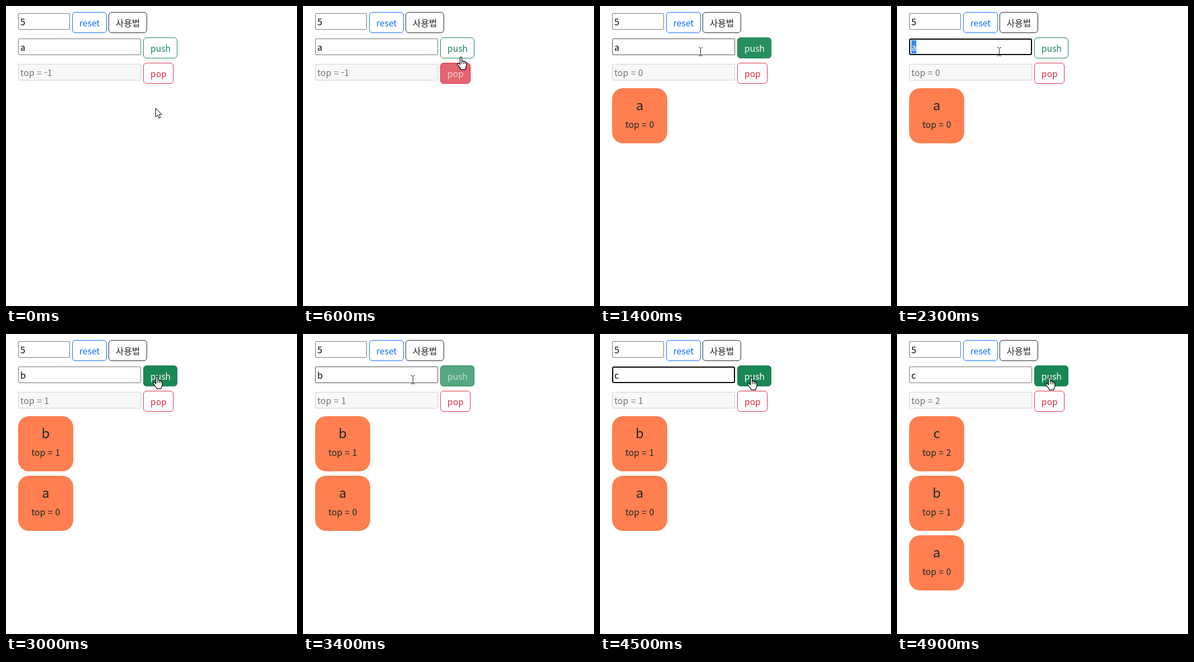
An HTML page that plays this animation: 528x544 px, repeating every 5000 ms.

```html
<!DOCTYPE html>
<html lang="ko">
<head>
<meta charset="utf-8">
<title>Stack</title>
<style>
  html, body { margin: 0; width: 100%; height: 100%; overflow: hidden; background: #fff; }
  svg { display: block; font: 16px "Noto Sans CJK KR", "Noto Sans KR", "Noto Sans CJK JP", "Noto Sans CJK", sans-serif; white-space: pre; }
</style>
</head>
<body>
<svg id="stage" width="528" height="544" viewBox="0 0 528 544"></svg>
<script>
const STEP = 100, LOOP = 5000;
const stage = document.getElementById('stage');

const BLUE = [13, 110, 253], DARK = [33, 37, 41], GREEN = [25, 135, 84], RED = [220, 53, 69];
const PUSH_HOVER = [[620, 1390], [2740, 3360], [4010, 9999]];
const POP_HOVER = [[40, 565]];
const PUSHES = [[1100, 'a'], [3000, 'b'], [4700, 'c']];
const TYPED = [[0, 'a'], [2500, 'b'], [3800, 'c']];
const FOCUS = [[1700, 2900], [3500, 4600]];
const SELECTED = [[1900, 2500], [3600, 3800]];

// time, shape, x, y
const CURSOR = [
  [0, 'arrow', 271, 185], [100, 'hand', 268, 128], [200, 'hand', 270, 118], [300, 'hand', 270, 118],
  [600, 'hand', 279, 92], [900, 'hand', 271, 72], [1100, 'hand', 270, 73], [1300, 'hand', 262, 78],
  [1400, 'beam', 182, 83], [2000, 'beam', 185, 83], [2500, 'beam', 185, 83], [2600, 'beam', 225, 82],
  [2700, 'hand', 252, 78], [3000, 'hand', 266, 76], [3200, 'hand', 266, 76], [3300, 'hand', 252, 79],
  [3400, 'beam', 199, 83], [3900, 'beam', 199, 83],
  [4000, 'hand', 253, 80], [4600, 'hand', 270, 78], [4900, 'hand', 269, 78]
];

const SHAPES = {
  arrow: '<path d="M.5.5V16.2L4.2 12.8 6.7 18.4 9.2 17.3 6.8 11.8H11.6Z" fill="#fff" stroke="#000"/>',
  hand: `<path d="M6 14V2.5C6 .1 9.3.1 9.3 2.5V8C9.8 6.9 12.3 7.1 12.4 8.8 13.2 7.8 15.2 8.3 15.3 9.8
    16.2 9.1 17.6 9.8 17.6 11.2V15.5C17.6 18.5 15.8 19.5 15.5 23.3H7.4C7 20.2 3.2 17.2 1.1 13.8
    .2 12 2.4 10.8 3.8 12.2Z" fill="#fff" stroke="#000" stroke-width="1.2" stroke-linejoin="round"/>
    <path d="M9.3 8V13M12.4 8.8V13M15.3 9.8V13.5" fill="none" stroke="#000"/>`,
  beam: '<path d="M-3-7.5H-.5M1.5-7.5H4M.5-7V7M-3 7.5H-.5M1.5 7.5H4" fill="none" stroke="#222"/>'
};

const clamp = v => Math.max(0, Math.min(1, v));
const within = (spans, t) => spans.find(([start, end]) => t >= start && t < end);
const rgb = c => `rgb(${c.map(Math.round)})`;
const fadeWhite = (c, k) => rgb(c.map(v => v + (255 - v) * k));

function hoverLevel(spans, t) {
  return spans.reduce((sum, [enter, leave]) => sum + clamp((t - enter) / 150) - clamp((t - leave) / 150), 0);
}

function label(x, y, text, fill, extra = '') {
  return `<text x="${x}" y="${y}" fill="${fill}" ${extra}>${text}</text>`;
}

function box(x, y, w, h, radius, fill, stroke, line = 1) {
  const half = line / 2;
  return `<rect x="${x + half}" y="${y + half}" width="${w - line}" height="${h - line}" rx="${radius}"
    fill="${fill}" stroke="${stroke}" stroke-width="${line}"/>`;
}

function button(x, y, w, text, color, level = 0) {
  return box(x, y, w, 38, 5.5, fadeWhite(color, 1 - level), rgb(color)) +
    label(x + 13, y + 26, text, fadeWhite(color, level));
}

function valueField(t, hovered) {
  const focus = within(FOCUS, t), selected = within(SELECTED, t);
  const [typedAt, text] = TYPED.findLast(([at]) => t >= at);
  let out = focus ? box(22, 59, 223, 30, 2, '#fff', '#000', 2)
    : box(22, 59, 223, 30, 1.5, '#fff', hovered ? '#4f4f4f' : '#767676');
  if (selected) out += '<rect x="26" y="62" width="9" height="24" fill="#388ef8"/>';
  out += label(26, 81, text, selected ? '#fff' : '#000');
  const caretOn = (t - Math.max(typedAt, focus ? focus[0] : 0)) % 1000 < 500;
  if (focus && !selected && caretOn) out += '<path d="M34.5 63V86" stroke="#000"/>';
  return out;
}

function stackItem(text, index, row) {
  const y = 149 + row * 108;
  return `<rect x="22" y="${y}" width="100" height="100" rx="20" fill="#ff7f50"/>` +
    label(72, y + 40, text, rgb(DARK), 'font-size="24" text-anchor="middle"') +
    label(72, y + 72, `top = ${index}`, rgb(DARK), 'text-anchor="middle"');
}

function cursorAt(t) {
  const i = CURSOR.findLastIndex(([at]) => t >= at);
  const [start, shape, x, y] = CURSOR[i];
  const next = CURSOR[i + 1];
  if (!next || next[1] !== shape) return { shape, x, y };
  const k = (t - start) / (next[0] - start);
  return { shape, x: Math.round(x + (next[2] - x) * k), y: Math.round(y + (next[3] - y) * k) };
}

function draw(t) {
  const items = PUSHES.filter(([at]) => t >= at);
  const top = items.length - 1;
  const cursor = cursorAt(t);
  stage.innerHTML =
    box(22, 13, 94, 30, 1.5, '#fff', '#767676') + label(26, 35, '5', '#000') +
    button(120, 11, 63, 'reset', BLUE) +
    button(186, 11, 70, '사용법', DARK) +
    valueField(t, cursor.shape === 'beam') +
    button(249, 57, 62, 'push', GREEN, hoverLevel(PUSH_HOVER, t)) +
    box(22, 105, 223, 30, 1.5, '#f8f8f8', '#d0d0d0') + label(26, 127, `top = ${top}`, '#757575') +
    button(249, 103, 55, 'pop', RED, hoverLevel(POP_HOVER, t)) +
    items.map(([, text], i) => stackItem(text, i, top - i)).join('') +
    `<g transform="translate(${cursor.x} ${cursor.y})">${SHAPES[cursor.shape]}</g>`;
}

let shown = -1;
function tick() {
  const t = Math.floor(performance.now() % LOOP / STEP) * STEP;
  if (t !== shown) draw(shown = t);
  requestAnimationFrame(tick);
}
tick();
</script>
</body>
</html>
```
